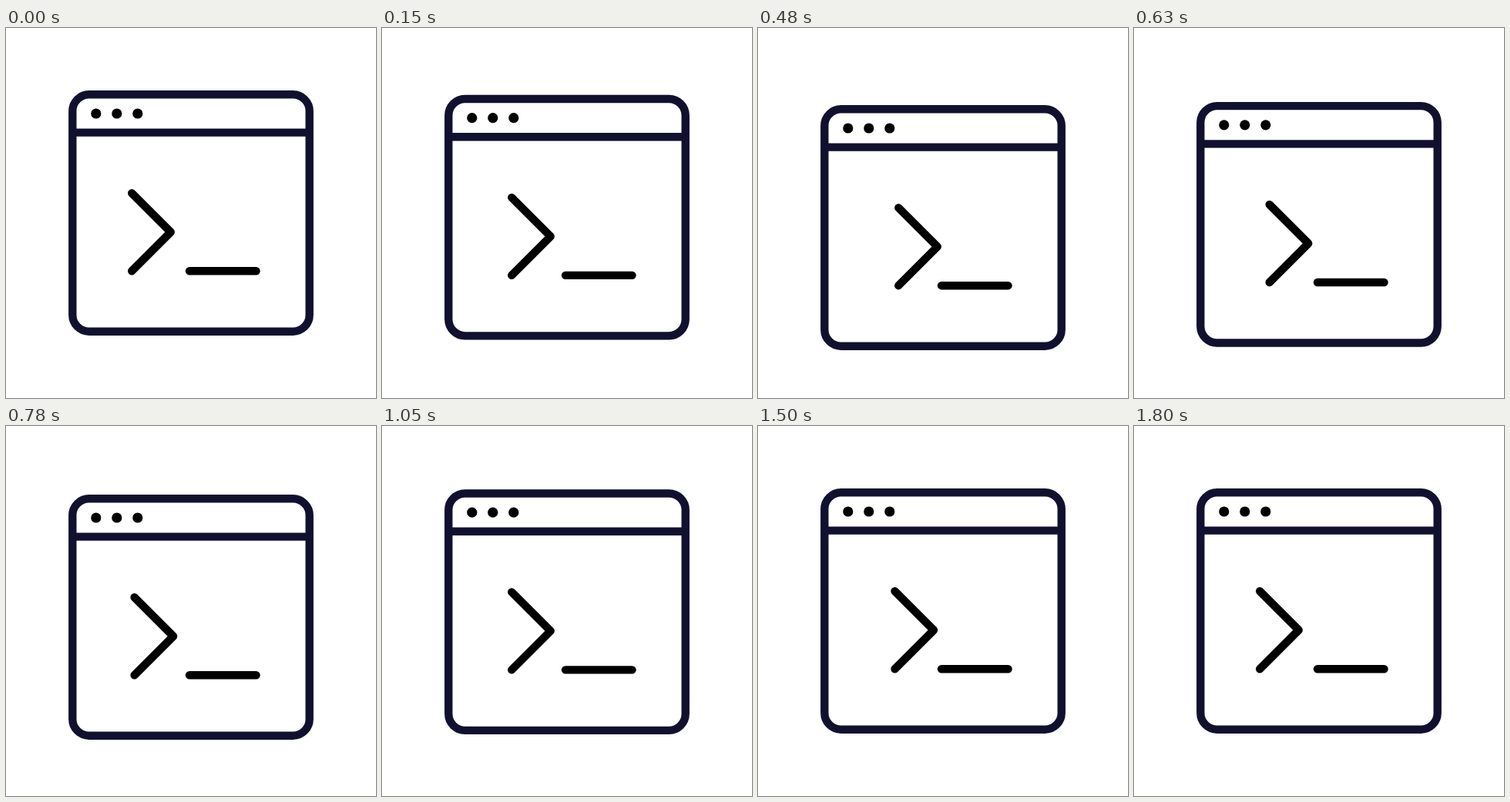
Animation of 480x480 px, one loop 1830 ms. Source, as an HTML page:

```html
<!DOCTYPE html>
<html lang="en">
<head>
<meta charset="utf-8">
<title>Terminal window</title>
<style>
  html, body { margin: 0; width: 100%; height: 100%; overflow: hidden; background: #fff; }
  svg { display: block; width: 100%; height: 100%; }
</style>
</head>
<body>
<svg viewBox="0 0 480 480" fill="none" stroke-width="10.4">
  <g id="terminal">
    <g stroke="#11112f">
      <rect x="86.3" y="86.3" width="307.4" height="307.4" rx="21.5"/>
      <path d="M86.3 135.6H393.7"/>
    </g>
    <g fill="#000">
      <circle cx="116.8" cy="111" r="6.6"/>
      <circle cx="143.8" cy="111" r="6.6"/>
      <circle cx="170.8" cy="111" r="6.6"/>
    </g>
    <g stroke="#000" stroke-linecap="round" stroke-linejoin="round">
      <path id="prompt" d="M163.2 214.2L213.7 264.7L163.2 315.2"/>
      <path id="cursor" d="M238 315.2H324.5"/>
    </g>
  </g>
</svg>
<script>
const STEP = 30, STEPS = 61, TRAVEL = 19.3;
const [terminal, prompt, cursor] =
  ['terminal', 'prompt', 'cursor'].map(id => document.getElementById(id));

// Ease with flat ends; x1 and x2 are the horizontal handle positions.
function ease(x, x1 = 1 / 3, x2 = 2 / 3) {
  if (x <= 0) return 0;
  if (x >= 1) return 1;
  let lo = 0, hi = 1;
  for (let i = 0; i < 24; i++) {
    const s = (lo + hi) / 2, r = 1 - s;
    if (3 * r * r * s * x1 + 3 * r * s * s * x2 + s ** 3 < x) lo = s;
    else hi = s;
  }
  return lo * lo * (3 - 2 * lo);
}

// The window drops quickly, then settles back with a long tail.
const drop = n => TRAVEL * (n < 14 ? ease(n / 14) : 1 - ease((n - 14) / 28, 1 / 3, 0.355));

// The prompt swings right and back twice per loop.
const swing = n => TRAVEL * ease(1 - Math.abs(n % 30 - 15) / 15);

function draw(ms) {
  const n = Math.floor(ms / STEP) % STEPS;
  const beat = n % 30;
  terminal.setAttribute('transform', `translate(0 ${drop(n).toFixed(3)})`);
  prompt.setAttribute('transform', `translate(${swing(n).toFixed(3)} 0)`);
  cursor.setAttribute('visibility', beat >= 8 && beat < 15 ? 'hidden' : 'visible');
}

const start = performance.now();
function tick() {
  draw(performance.now() - start);
  requestAnimationFrame(tick);
}
tick();
</script>
</body>
</html>
```
